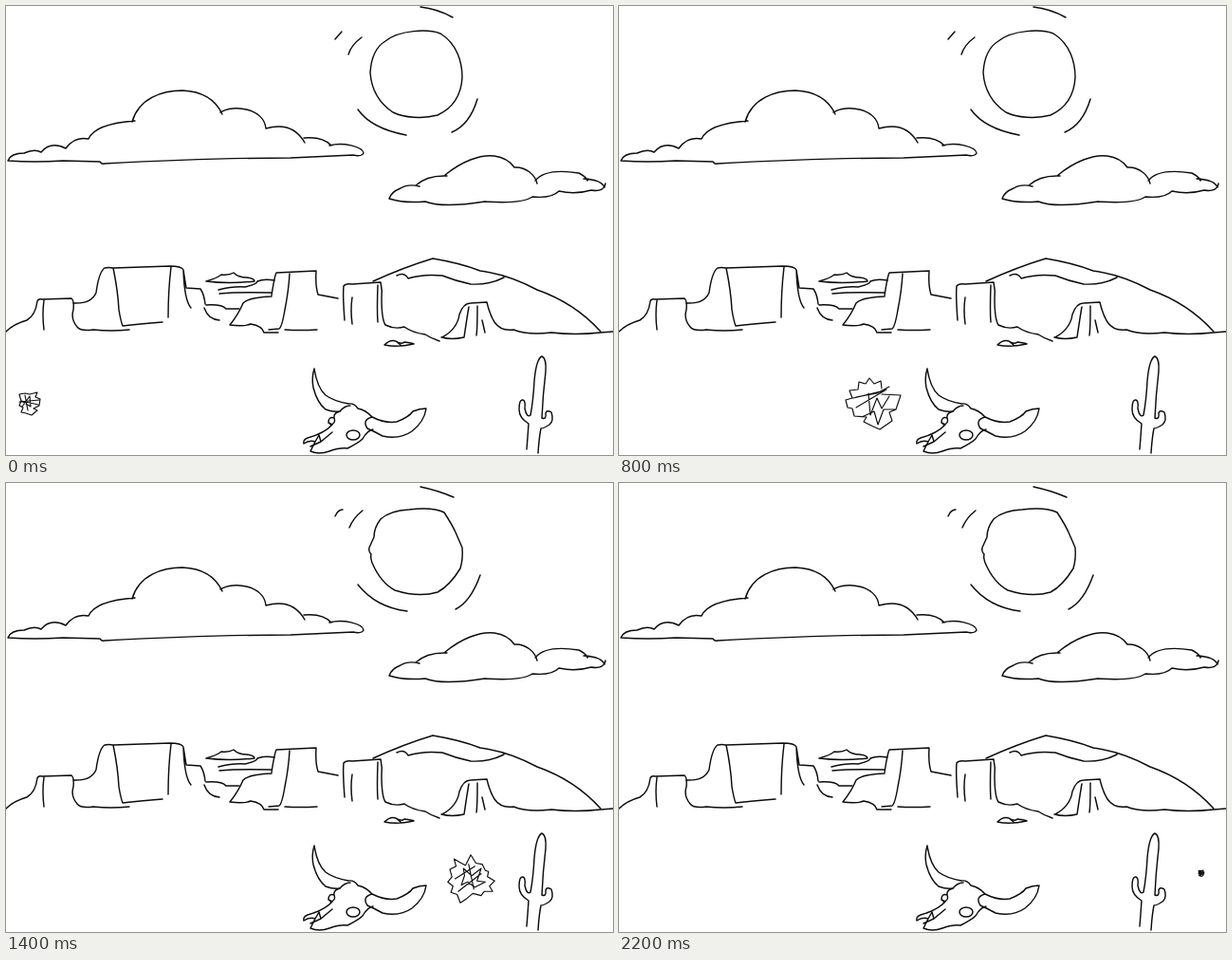
These frames come from a looping animation (640 px wide and 473 px high, 2400 ms). An HTML page:

```html
<!DOCTYPE html>
<html lang="en">
<head>
<meta charset="utf-8">
<title>Tumbleweed</title>
<style>
  html, body { margin: 0; width: 100%; height: 100%; overflow: hidden; background: #fff; }
  svg { display: block; width: 100%; height: 100%; }
  svg path, svg ellipse {
    fill: none; stroke: #0c0c0c; stroke-width: 1.45;
    stroke-linecap: round; stroke-linejoin: round;
    vector-effect: non-scaling-stroke;
  }
  #weed { stroke-width: 1.15; }
</style>
</head>
<body>
<svg viewBox="0 0 640 473">
  <g id="clouds">
    <path d="M2 163Q5 155 19 155Q30 150 37 154Q47 142 63 150Q72 137 87 140Q94 124 136 121
      M133 122C140 97 165 89 186 89C210 90 222 101 228 114M226 112C240 103 272 108 274 129
      Q302 121 315 144M314 139Q334 137 343 147M341 147C355 143 376 148 377 155Q375 159 366 157
      L300 160C240 160 160 163 104 166Q101 167 99 164L60 163Q30 165 2 163"/>
    <path d="M404 203Q406 196 416 192Q424 187 436 190M432 189Q444 178 465 179M463 178
      C480 164 500 156 515 158Q529 160 536 170C548 169 558 178 560 187M558 184
      C566 174 585 173 604 176Q612 180 613 184M609 182Q628 183 631 191L632 187M631 190
      Q628 196 617 194Q600 199 583 195Q575 203 555 201C545 208 520 207 505 206
      C480 210 455 211 442 206Q420 208 404 203"/>
    <path d="M211 290Q222 287 227 283Q235 284 240 281Q245 286 254 286Q262 287 262 290Q235 293 211 290
      M224 299Q240 295 252 296Q265 293 265 290Q272 287 283 289M225 303Q245 301 280 302"/>
  </g>
  <g id="mesas">
    <path d="M0 343Q8 335 22 331Q31 326 33 311Q34 308 38 309L69 308Q72 310 71 320Q68 330 75 338
      Q79 343 92 341Q110 343 130 341M40 310Q38 325 40 341"/>
    <path d="M71 313Q90 314 95 302Q98 280 104 276Q108 275 113 276L173 274Q185 274 187 278L190 297
      L205 298Q209 304 210 314M113 276Q118 300 119 320Q121 332 123 337Q140 335 165 333
      M174 275Q171 300 171 328M187 278Q188 310 195 318M209 318Q213 330 225 331M211 315
      Q228 314 232 319L246 319"/>
    <path d="M280 306Q255 307 250 313Q245 325 236 336Q250 338 258 335Q270 337 272 344L287 344
      M280 305Q283 285 285 281L327 279Q326 295 329 304L350 308M299 282Q298 300 294 320
      Q291 338 288 340L277 341M294 341Q310 342 328 341"/>
    <path d="M357 331Q355 305 356 295Q358 292 365 293L395 291Q397 300 396 308Q396 330 400 336
      Q410 341 420 338Q428 344 442 346Q448 350 457 353M365 307Q363 320 365 335M392 294
      Q391 320 392 333"/>
    <path d="M387 290Q420 275 450 266Q480 271 500 279Q530 283 560 299Q600 313 627 343
      M412 284Q420 280 424 287Q440 282 460 284Q475 290 490 293Q510 294 525 286"/>
    <path d="M460 349Q476 340 478 325Q482 313 490 313L507 312Q510 325 515 333Q522 343 535 341
      Q550 347 575 344Q600 347 627 344L640 343M459 349Q470 352 483 349Q487 322 488 317
      M497 316Q497 340 496 347M502 331L505 344"/>
    <path d="M399 357Q405 351 411 353Q417 357 420 354Q428 355 430 356Q412 360 399 357M411 353L416 357"/>
  </g>
  <g id="skull">
    <path d="M325 382Q322 392 324 402Q328 418 337 425Q345 428 352 427Q357 421 363 421
      M325 382Q328 402 337 410Q345 416 361 419Q367 418 371 424Q380 426 386 433Q400 440 412 438
      Q425 433 429 427Q436 424 443 424Q441 438 428 448Q415 457 397 453Q388 448 381 445
      Q375 436 386 433"/>
    <path d="M352 427Q345 429 346 434Q340 432 340 439L344 441Q336 450 318 455Q313 457 314 461
      Q320 457 326 459L321 469Q330 473 341 469Q352 465 360 466Q372 460 376 456Q381 447 387 446
      M346 434Q348 440 342 441M326 459L330 452L332 459L321 464M332 459L344 449"/>
    <ellipse cx="366" cy="452" rx="7" ry="5"/>
  </g>
  <path id="cactus" d="M549 467Q550 455 551 440Q541 434 541 425Q541 414 545 415Q548 416 547 424
    Q549 434 553 431Q556 415 557 395Q559 372 565 369Q570 371 569 385Q566 410 565 434
    Q570 436 569 429Q570 425 575 428Q578 437 573 441Q567 445 564 445Q562 455 561 471"/>
  <g class="sun">
    <path d="M400 37C415 25 445 24 458 29C476 40 481 60 481 75C480 95 470 108 455 115
      C440 119 420 118 408 112C390 100 385 85 384 70C385 55 390 43 400 37Z"/>
    <path d="M437 1Q455 3 471 12M347 35L354 27M361 51Q364 41 375 33M371 109Q385 129 422 136
      M470 133Q489 125 497 98"/>
  </g>
  <g class="sun">
    <path d="M395 38Q405 29 425 28Q450 25 462 31Q471 45 474 52L481 68Q482 80 479 90
      Q468 108 455 115Q435 121 410 113Q395 105 386 84Q384 78 385 75Q382 72 383 68L388 57
      Q388 47 395 38Z"/>
    <path d="M437 4Q456 8 472 15M347 35Q350 28 355 28M362 47Q366 37 376 29M371 107
      Q390 131 423 135M474 133Q490 125 500 97"/>
  </g>
  <path id="weed"/>
</svg>
<script>
  const STEP = 200;

  // Tumbleweed drawings, each centred on 0,0
  const shapes = {
    knot: `M-11 -9L-5 -10 0 -9 8 -11 6 -6 11 -4 10 3 4 6 8 8 2 13 -4 11 -9 10 -7 5 -11 3 -9 -2Z
      M-11 -1L10 -3M-8 4L0 -7 1 4 -9 -2 9 2M-5 -8L-2 8`,
    tuft: `M-16 -15L-9 -14 -5 -18 0 -12 5 -17 7 -12 16 -12 12 -6 17 -4 13 3 8 6 9 13 3 19 -4 17
      -9 18 -10 13 -17 12 -14 6 -18 2 -13 -2 -19 -7 -13 -9Z
      M-15 -10L15 -3M-11 1L15 -10M-6 -14L0 3M-4 6L8 -6 14 5`,
    crown: `M-29 -4L-22 -6 -25 -14 -16 -15 -15 -23 -8 -21 -4 -27 1 -21 8 -24 9 -16
      M17 -18L4 -11 -18 -7M9 -10L29 -9 24 6 17 9 20 18 7 27 0 24 -10 19 -7 14 -20 13 -22 5 -27 4 -29 -4
      M-21 -6L12 -14M-18 4L-3 -5 14 -15M-5 -11L-3 12 4 -6 9 5 17 -8M-12 14L1 8 5 22 11 6 24 6`,
    star: `M-16 -19L-9 -15 -5 -13 0 -23 5 -15 11 -14 14 -8 17 -7 16 -2 23 2 18 7 21 12 13 12
      10 16 2 14 -4 19 -10 23 -13 15 -19 13 -17 7 -22 3 -18 -2 -20 -9 -14 -12Z
      M-7 -10L1 -3 10 -10 6 2 14 3 4 8 -3 3 -9 6 -6 -3ZM-15 0L4 -12M-2 -14L3 10M-12 12L10 -5`
  };

  // Drawing, x, y, scale
  const poses = [
    ["knot", 25, 418, 1],
    ["tuft", 112, 415, 1],
    ["star", 178, 417, 1],
    ["crown", 227, 417, 0.92],
    ["crown", 268, 419, 1],
    ["star", 354, 430, 1.24],
    ["crown", 414, 413, 1],
    ["star", 490, 417, 1.1],
    ["star", 514, 417, 1],
    ["tuft", 594, 417, 0.95],
    ["knot", 598, 414, 0.72],
    ["knot", 614, 411, 0.26]
  ];

  const weed = document.getElementById("weed");
  const suns = document.querySelectorAll(".sun");
  let shown = -1;

  function draw(now) {
    const step = Math.floor(now / STEP) % poses.length;
    if (step !== shown) {
      const [shape, x, y, scale] = poses[step];
      weed.setAttribute("d", shapes[shape]);
      weed.setAttribute("transform", `translate(${x} ${y}) scale(${scale})`);
      suns.forEach((sun, i) => { sun.style.display = i === step % 2 ? "" : "none"; });
      shown = step;
    }
  }

  const start = performance.now();
  function tick() {
    draw(performance.now() - start);
    requestAnimationFrame(tick);
  }
  tick();
</script>
</body>
</html>
```
